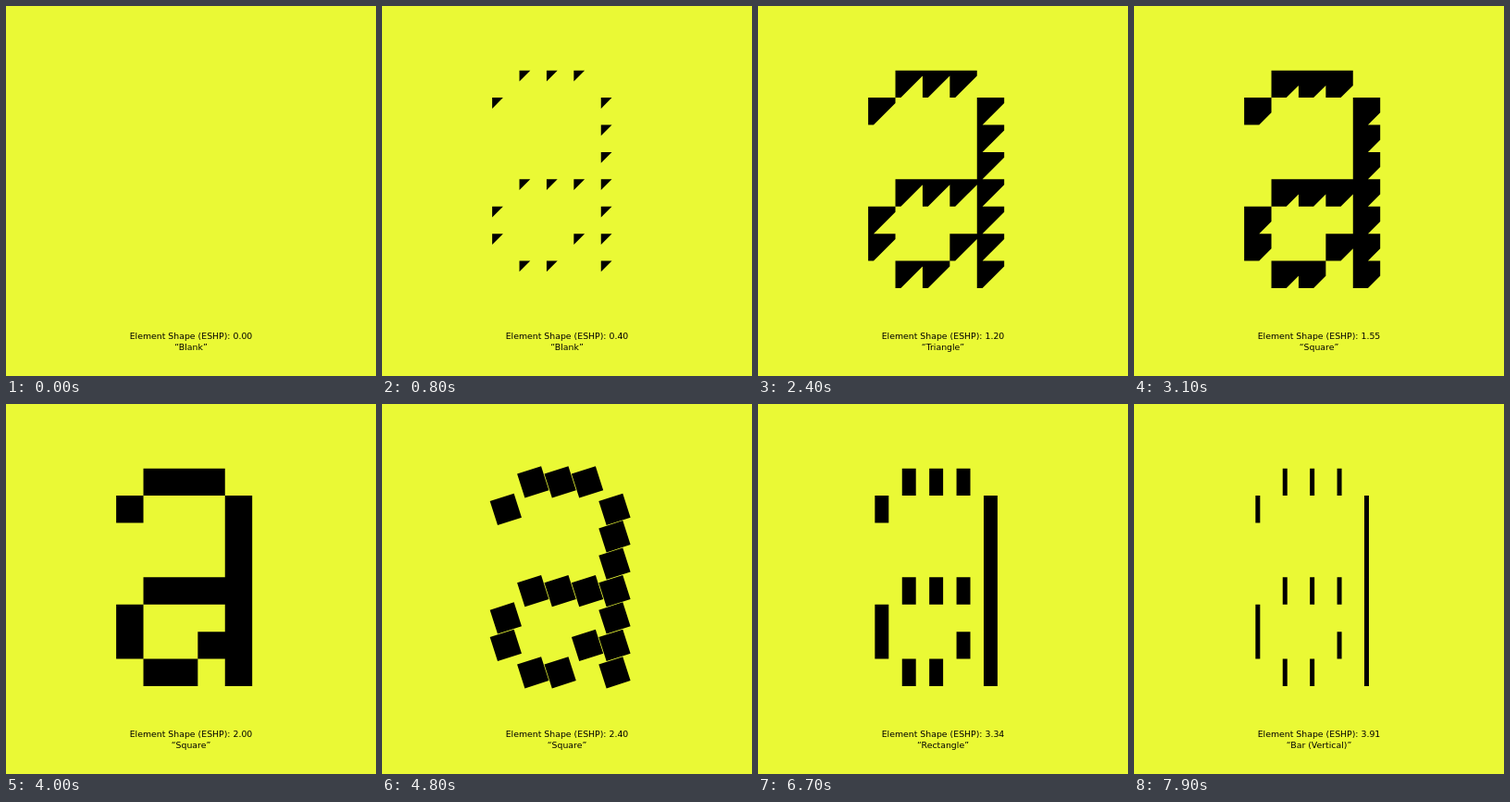
An HTML page with a canvas for the animation above (8000 ms loop, 400 px wide and 400 px high).

```html
<!DOCTYPE html>
<html lang="en">
<head>
<meta charset="utf-8">
<title>Element Shape</title>
<style>
  html, body { margin: 0; width: 100%; height: 100%; overflow: hidden; background: #eaf935; }
  canvas { display: block; width: 400px; height: 400px; }
</style>
</head>
<body>
<canvas id="stage" width="400" height="400"></canvas>
<script>
const ctx = document.getElementById('stage').getContext('2d');
const LOOP = 8000, STEP = 100;

// The glyph is centred with a quarter cell of side bearing and stands on y = 305
const CELL = 500 / 17;
const LEFT = 200 - 2.75 * CELL;
const TOP = 305 - 8 * CELL;

const GLYPH = [
  '.###.',
  '#...#',
  '....#',
  '....#',
  '.####',
  '#...#',
  '#..##',
  '.##.#'
];

// Upper limit of the axis value for each label
const LABELS = [
  [0.5, 'Blank'], [1.25, 'Triangle'], [2.125, 'Square'], [2.375, 'Diamond'],
  [2.75, 'Square'], [3.25, 'Block'], [3.75, 'Rectangle'], [Infinity, 'Bar (Vertical)']
];

const axisAt = t => t <= 6000 ? t / 2000 : 3 + (t - 6000) * 0.00048;

const labelFor = v => LABELS.find(([limit]) => v < limit)[1];

// Corners of one element in cell units
function element(v) {
  if (v <= 1) return [[0, 0], [v, 0], [0, v]];
  if (v < 2) return [[0, 0], [1, 0], [1, v - 1], [v - 1, 1], [0, 1]];
  if (v < 2.5) return turningSquare((v - 2) * 4);
  const half = (1 - (v - 2.5) * 10 / 17) / 2;
  return [[0.5 - half, 0], [0.5 + half, 0], [0.5 + half, 1], [0.5 - half, 1]];
}

// Corners move straight from square (0) to diamond (1) to square (2)
function turningSquare(k) {
  const r = Math.SQRT1_2;
  const mix = k <= 1 ? k : k - 1;
  const start = k <= 1 ? -135 : -90;
  return [0, 90, 180, 270].map(turn => {
    const a = (start + turn) * Math.PI / 180;
    const b = a + Math.PI / 4;
    return [
      0.5 + r * (Math.cos(a) * (1 - mix) + Math.cos(b) * mix),
      0.5 + r * (Math.sin(a) * (1 - mix) + Math.sin(b) * mix)
    ];
  });
}

function drawGlyph(v) {
  const corners = element(v);
  ctx.beginPath();
  GLYPH.forEach((line, row) => [...line].forEach((mark, col) => {
    if (mark !== '#') return;
    corners.forEach(([x, y], i) => {
      const px = LEFT + (col + x) * CELL;
      const py = TOP + (row + y) * CELL;
      if (i) ctx.lineTo(px, py);
      else ctx.moveTo(px, py);
    });
    ctx.closePath();
  }));
  ctx.fill();
}

function draw(t) {
  const v = axisAt(t);
  ctx.fillStyle = '#eaf935';
  ctx.fillRect(0, 0, 400, 400);
  ctx.fillStyle = '#000';
  if (v > 0) drawGlyph(v);
  ctx.font = '9.35px "DejaVu Sans", sans-serif';
  ctx.textAlign = 'center';
  ctx.fillText(`Element Shape (ESHP): ${v.toFixed(2)}`, 200, 360);
  ctx.fillText(`\u201c${labelFor(v)}\u201d`, 200, 372);
}

const begin = performance.now();
function tick() {
  const t = (performance.now() - begin) % LOOP;
  draw(Math.floor(t / STEP) * STEP);
  requestAnimationFrame(tick);
}
tick();
</script>
</body>
</html>
```
